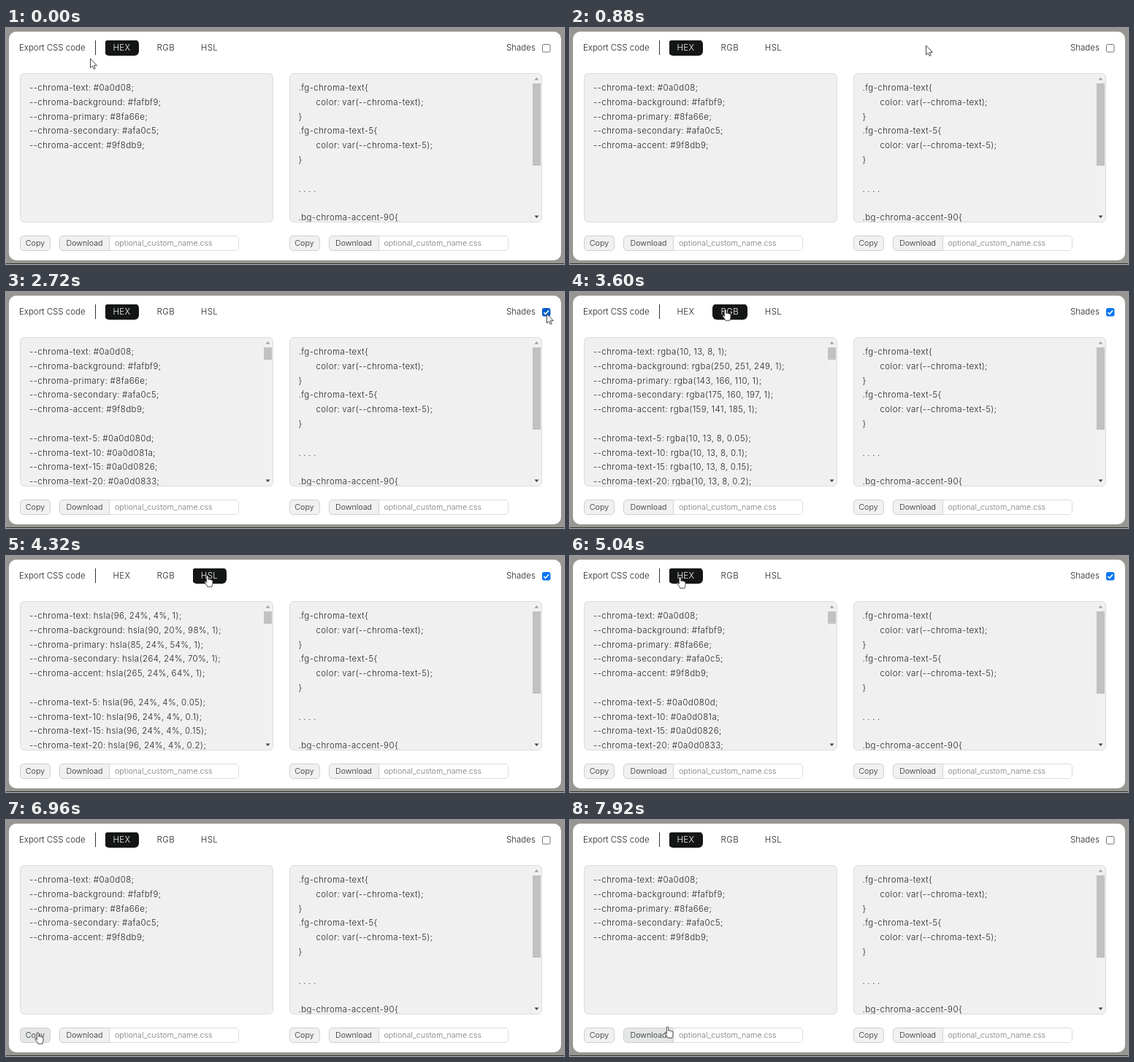
An HTML page that plays this animation: 764x324 px, repeating every 8000 ms.

```html
<!DOCTYPE html>
<html lang="en">
<head>
<meta charset="utf-8">
<title>Export CSS code</title>
<style>
  * { box-sizing: border-box; }
  html, body { margin: 0; width: 100%; height: 100%; overflow: hidden; }
  body { position: relative; background: #979692; color: #222; font: 350 11.5px/20px Inter, "Open Sans", sans-serif; }
  body::after { content: ""; position: absolute; left: 0; right: 0; top: 323px; height: 1px; background: #35342f; }
  div, pre, svg { position: absolute; }
  .card { left: 3.5px; top: 4.5px; width: 756px; height: 314.5px; border-radius: 10px; background: #fff; }
  .label { top: 17px; white-space: nowrap; }
  .rule { left: 122px; top: 17px; width: 1px; height: 20px; background: #333; }
  .tab { top: 16px; height: 22px; line-height: 22px; border-radius: 6px; text-align: center; letter-spacing: .4px; }
  .tab.on { background: linear-gradient(#141515, #141515) .5px .5px no-repeat; color: #fff; }
  .check { left: 734px; top: 21.5px; }
  .panel { top: 62px; height: 204.5px; overflow: hidden; background: #f0f0f0; border: 1px solid #dcdcdc; border-radius: 6px; }
  pre { left: 12px; top: 10px; margin: 0; font: inherit; line-height: 19.8px; letter-spacing: .43px; word-spacing: -.5px; tab-size: 24px; }
  .bar { right: 1px; top: 0; width: 11px; height: 203px; background: #f1f1f1; }
  .thumb { left: 0; top: 13px; width: 11px; background: #c1c1c1; }
  .bar svg { left: 0; top: 0; }
  .btn, .field { top: 285px; height: 21px; line-height: 20px; font-size: 10.7px; border: 1px solid #d0d0d0; white-space: nowrap; }
  .btn { background: #f1f1f1; border-radius: 5px; text-align: center; color: #2a2a2a; }
  .btn.hot { background: #e5e7e7; }
  .join { border-radius: 5px 0 0 5px; }
  .field { padding-left: 7px; color: #777; border-left: 0; border-color: #dcdcdc; border-radius: 0 5px 5px 0; }
  #cursor { left: 0; top: 0; overflow: visible; }
  #cursor path { fill: #fff; stroke: #333; stroke-width: .9; stroke-linejoin: round; }
</style>
</head>
<body>
<div class="card"></div>
<div class="label" style="left:18px">Export CSS code</div>
<div class="rule"></div>
<div class="label" style="left:685px">Shades</div>
<svg class="check" width="12" height="12">
  <rect id="box" x=".5" y=".5" width="10.5" height="10.5" rx="1.8"/>
  <path id="tick" d="M2.4 6 L4.7 8.3 L9.2 3.2" fill="none" stroke="#fff" stroke-width="1.6"/>
</svg>
<svg id="cursor" width="12" height="17">
  <path id="arrow" d="M.5 0 V12.8 L3.4 10.2 L5.3 14.4 L7.2 13.6 L5.4 9.4 H9.3 Z"/>
  <path id="hand" transform="translate(-1.5 -1.5)" d="M-1.2 10 V1.6 a1.3 1.3 0 0 1 2.6 0 V6 a1.2 1.2 0 0 1 2.3 .4 a1.1 1.1 0 0 1 2.1 .5 a1 1 0 0 1 1.7 .8 V11 c0 2 -1 2.5 -1 4.7 H.3 C-.2 13.4 -2.8 11.6 -3.6 9.2 c-.3 -1.3 1.2 -1.6 2.4 .3 Z"/>
</svg>
<script>
const LOOP = 8000, STEP = 80;
const $ = id => document.getElementById(id);
const cursor = $("cursor");

function add(parent, cls, css, text = "", tag = "div") {
  const el = document.createElement(tag);
  el.className = cls;
  el.style.cssText = css;
  el.textContent = text;
  if (parent === document.body) parent.insertBefore(el, cursor);
  else parent.append(el);
  return el;
}

// Tabs and buttons
const span = (x, w) => `left:${x}px;width:${w}px`;
const tabs = [["HEX", 135, 47], ["RGB", 194.5, 48.5], ["HSL", 255, 47]]
  .map(([name, x, w]) => ({ name, x, w, y: 16, h: 22, el: add(document.body, "tab", span(x, w), name) }));
const columns = [19, 387.5];
const buttons = [];
for (const x of columns) {
  for (const [name, dx, w, cls] of [["Copy", 0, 42, "btn"], ["Download", 54, 69, "btn join"]])
    buttons.push({ x: x + dx, w, y: 284, h: 22, el: add(document.body, cls, span(x + dx, w), name) });
  add(document.body, "field", span(x + 123, 177), "optional_custom_name.css");
}

// Code panels
function panel(x, thumb) {
  const root = add(document.body, "panel", span(x, 346.5));
  const text = add(root, "", "", "", "pre");
  const bar = add(root, "bar", "");
  add(bar, "thumb", `height:${thumb}px`);
  bar.insertAdjacentHTML("beforeend", `<svg width="11" height="203">
    <path d="M2.5 8.5 L5.5 5 L8.5 8.5Z" fill="#a0a0a0"/>
    <path d="M2.5 194.5 L5.5 198 L8.5 194.5Z" fill="#444"/></svg>`);
  return { text, bar };
}
const left = panel(columns[0], 17), right = panel(columns[1], 113);
const rule = name => `.fg-chroma-${name}{\n\tcolor: var(--chroma-${name});\n}\n`;
right.text.textContent = rule("text") + rule("text-5") + "\n. . . .\n\n.bg-chroma-accent-90{";

// Colour formats
const palette = {
  text: [10, 13, 8], background: [250, 251, 249], primary: [143, 166, 110],
  secondary: [175, 160, 197], accent: [159, 141, 185]
};
const hex = n => Math.round(n).toString(16).padStart(2, "0");

function hsl([r, g, b]) {
  const max = Math.max(r, g, b), min = Math.min(r, g, b), d = max - min, sum = max + min;
  const h = max === r ? (g - b) / d + 6 : max === g ? (b - r) / d + 2 : (r - g) / d + 4;
  const s = d / (sum > 255 ? 510 - sum : sum);
  return `${Math.round(h * 60) % 360}, ${Math.round(s * 100)}%, ${Math.round(sum / 5.1)}%`;
}
const formats = {
  HEX: (c, a) => "#" + c.map(hex).join("") + (a < 1 ? hex(a * 255) : ""),
  RGB: (c, a) => `rgba(${c.join(", ")}, ${a})`,
  HSL: (c, a) => `hsla(${hsl(c)}, ${a})`
};

function variables(mode, shades) {
  const line = (name, c, a) => `--chroma-${name}: ${formats[mode](c, a)};`;
  const out = Object.entries(palette).map(([name, c]) => line(name, c, 1));
  if (shades) {
    out.push("");
    for (let p = 5; p <= 25; p += 5) out.push(line("text-" + p, palette.text, p / 100));
  }
  return out.join("\n");
}

// Pointer stops: time, x, y
const stops = [
  [0, 115, 42], [80, 115, 42], [420, 300, 45], [880, 487, 24], [1000, 487, 24],
  [1480, 752, 23], [1760, 740, 30], [2720, 740, 30], [3040, 520, 4], [3400, 214, 25],
  [3680, 214, 25], [3960, 277, 28], [4480, 277, 28], [4840, 152, 30], [5400, 152, 30],
  [5720, 470, 9], [6000, 741, 24], [6480, 741, 24], [6960, 45, 293], [7280, 45, 293],
  [7680, 135, 285], [8000, 135, 285]
];
// Clicks: time, mode, shades
const clicks = [
  [0, "HEX", false], [2160, "HEX", true], [3440, "RGB", true],
  [4080, "HSL", true], [4960, "HEX", true], [6320, "HEX", false]
];

function pointer(t) {
  const i = stops.findIndex(s => s[0] > t);
  const [t0, x0, y0] = stops[i - 1], [t1, x1, y1] = stops[i];
  const u = (t - t0) / (t1 - t0), k = u * u * (3 - 2 * u);
  return [x0 + (x1 - x0) * k, y0 + (y1 - y0) * k];
}

let last = "";
function draw(t) {
  const [x, y] = pointer(t);
  const over = b => x >= b.x && x < b.x + b.w && y >= b.y && y < b.y + b.h;
  const [, mode, shades] = clicks.filter(c => c[0] <= t).pop();

  const key = mode + shades;
  if (key !== last) {
    last = key;
    left.text.textContent = variables(mode, shades);
    left.bar.style.display = shades ? "block" : "none";
    tabs.forEach(b => b.el.classList.toggle("on", b.name === mode));
  }

  const hot = over({ x: 733, y: 20, w: 14, h: 14 });
  const blue = hot ? "#005cc8" : "#0b75f5";
  $("box").setAttribute("fill", shades ? blue : "#fff");
  $("box").setAttribute("stroke", shades ? blue : hot ? "#4f4f4f" : "#707070");
  $("tick").style.display = shades ? "" : "none";

  buttons.forEach(b => b.el.classList.toggle("hot", over(b)));
  const hand = tabs.concat(buttons).some(over);
  $("hand").style.display = hand ? "" : "none";
  $("arrow").style.display = hand ? "none" : "";
  cursor.style.transform = `translate(${x}px, ${y}px)`;
}

const start = performance.now();
function tick() {
  const t = (performance.now() - start) % LOOP;
  draw(Math.floor(t / STEP) * STEP);
  requestAnimationFrame(tick);
}
tick();
</script>
</body>
</html>
```
